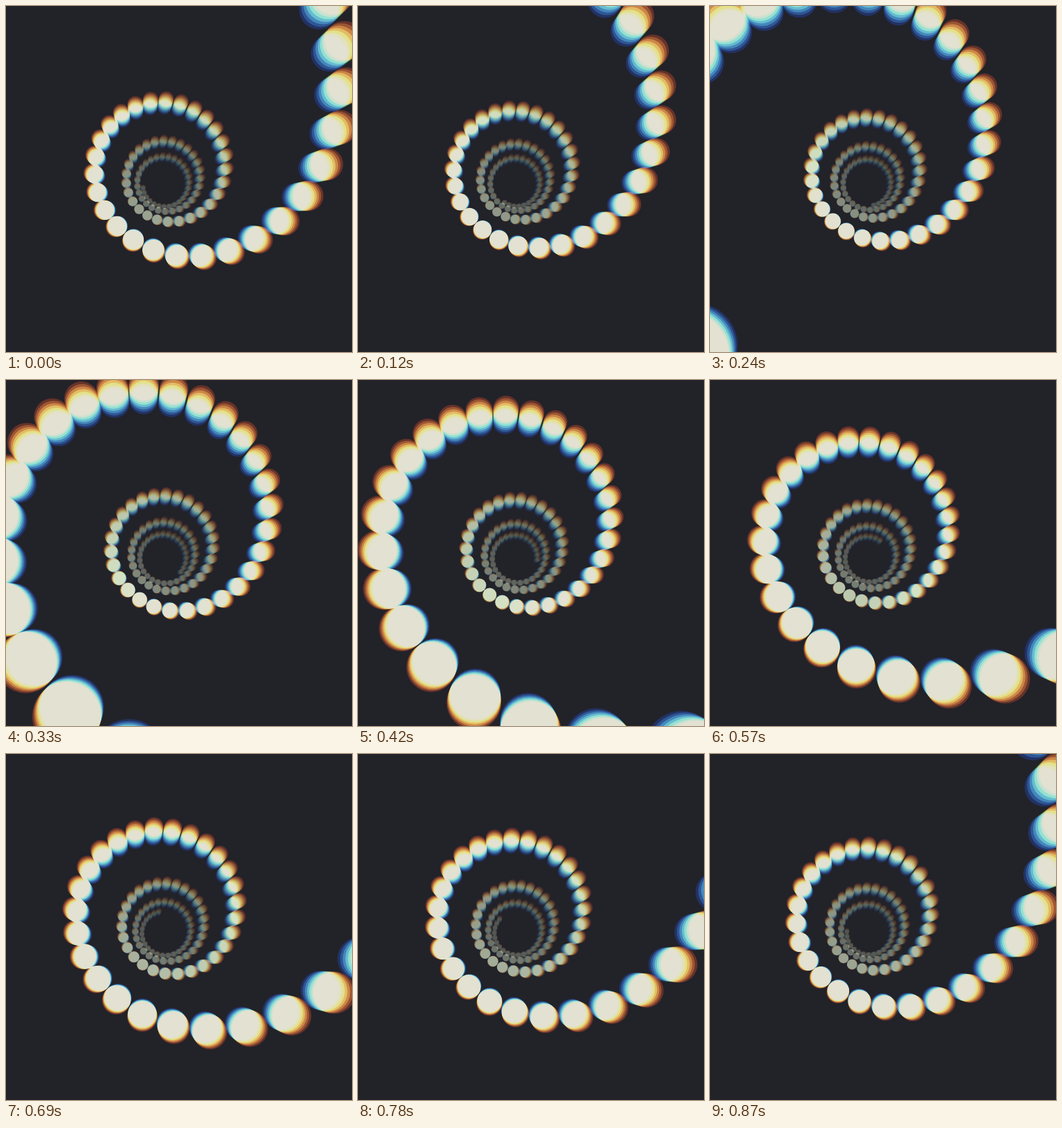
These frames come from a looping animation (500x500 px, 0.9 s). An HTML page with a canvas:

```html
<!DOCTYPE html>
<html>
<head>
<meta charset="utf-8">
<style>
  html, body { margin: 0; width: 100%; height: 100%; overflow: hidden; background: #222229; }
  canvas { display: block; }
</style>
</head>
<body>
<canvas id="stage" width="500" height="500"></canvas>
<script>
const ctx = document.getElementById('stage').getContext('2d');
const TAU = Math.PI * 2;
const LOOP = 900;
const PER_TURN = 27;            // dots in one turn of the helix
const STEPS = 3;                // dots each loop advances around the axis
const LAYERS = 7;               // colour copies, red (outer) to blue (inner)
const SPREAD = 0.078;           // difference in zoom between red and blue
const NEAR = 0.21, FAR = 4.1;
const VANISH = { x: 223, y: 270 };
const FOCUS = { x: 195, y: 300 }; // point where the colour copies coincide
const AXIS = { x: 22, y: -48 };   // helix axis relative to the camera
const RADIUS = 125, DOT = 14;

function helixDots(t) {
  const dots = [];
  const phase = STEPS * t - 0.18;
  for (let j = -2 * PER_TURN; j < 4 * PER_TURN; j++) {
    const turn = (j + phase) / PER_TURN;
    const depth = 0.595 + t + turn;
    if (depth < NEAR || depth > FAR) continue;
    dots.push({
      x: VANISH.x + (AXIS.x + RADIUS * Math.cos(turn * TAU)) / depth,
      y: VANISH.y + (AXIS.y + RADIUS * Math.sin(turn * TAU)) / depth,
      r: DOT / depth,
      alpha: Math.min(1, 1.1 * depth ** -1.2)
    });
  }
  return dots;
}

function layerColor(p) {
  const rgb = [0.35 * (1 - p), 0.08 + 0.8 * p * (1 - p), 0.35 * p];
  return `rgb(${rgb.map(v => Math.round(v * 255))})`;
}

function fill(mode, color) {
  ctx.globalCompositeOperation = mode;
  ctx.fillStyle = color;
  ctx.fillRect(0, 0, 500, 500);
}

function draw(now) {
  const dots = helixDots(now % LOOP / LOOP);
  fill('source-over', '#000');
  ctx.globalCompositeOperation = 'lighter';
  for (let k = 0; k < LAYERS; k++) {
    const p = k / (LAYERS - 1);
    const zoom = 1 + SPREAD * (0.5 - p);
    ctx.fillStyle = layerColor(p);
    for (const d of dots) {
      ctx.globalAlpha = d.alpha;
      ctx.beginPath();
      ctx.arc(FOCUS.x + (d.x - FOCUS.x) * zoom, FOCUS.y + (d.y - FOCUS.y) * zoom, d.r * zoom, 0, TAU);
      ctx.fill();
    }
  }
  ctx.globalAlpha = 1;
  fill('multiply', '#dfdcc8');
  fill('screen', '#222229');
  requestAnimationFrame(draw);
}
requestAnimationFrame(draw);
</script>
</body>
</html>
```
